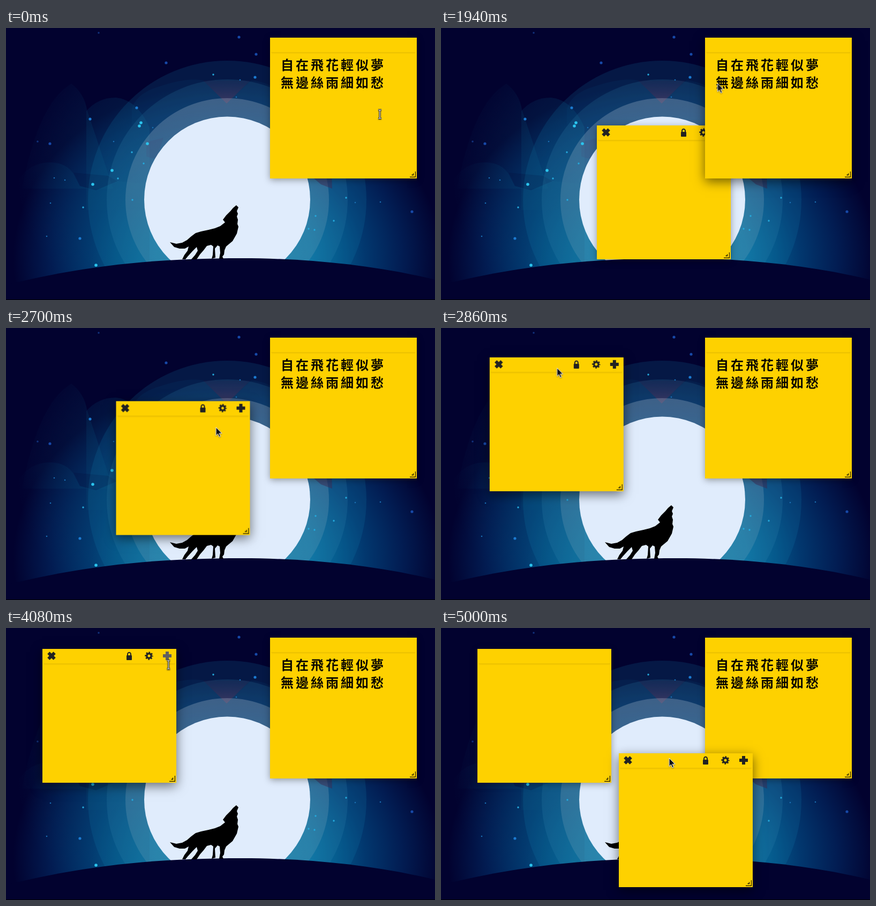
Recreate the animation shown at these times as an HTML page. Size 801 by 508 pixels, loop 5.76 s.

```html
<!DOCTYPE html>
<html lang="zh-Hant">
<head>
<meta charset="utf-8">
<title>Sticky notes</title>
<style>
html, body { margin: 0; width: 100%; height: 100%; overflow: hidden; background: #02022f; }
#stage { position: relative; width: 801px; height: 508px; overflow: hidden; }
#stage > * { position: absolute; left: 0; top: 0; }

.note {
  --near: 0 3px 12px rgba(0, 0, 0, .36);
  --far: 0 6px 20px rgba(0, 0, 0, .55);
  width: 250px; height: 250px;
  background: #fed100;
  box-shadow: var(--near);
}
.bar {
  position: absolute; left: 2px; right: 2px; top: 0; height: 27px;
  border-bottom: 1px solid rgba(110, 80, 0, .12);
  box-shadow: 0 2px 2px -1px rgba(110, 80, 0, .14);
}
.icons { position: absolute; inset: 0; visibility: hidden; color: #222; }
.icons svg { position: absolute; top: 4px; width: 18px; height: 18px; }
.close { left: 8px; }
.lock { right: 79px; }
.gear { right: 42px; }
.plus { right: 8px; }
.grip { position: absolute; right: 2px; bottom: 2px; width: 13px; height: 13px; }
.text {
  position: absolute; left: 20px; top: 33px; white-space: pre;
  font: 700 24px/33px "Noto Sans CJK TC", "Noto Sans CJK", serif;
  letter-spacing: 4px; color: #0a0800;
}

/* loop length 5760 ms */
.note, .icons, .plus { animation: 5760ms step-end infinite; }
#n1 { left: 493px; top: 18px; width: 274px; height: 263px; z-index: 2; animation-name: state1; }
#n2 { animation-name: state2, move2; animation-timing-function: step-end, linear; }
#n3 { animation-name: state3, move3; animation-timing-function: step-end, linear; }
#n1 .icons { animation-name: icons1; }
#n2 .icons { animation-name: icons2; }
#n3 .icons { animation-name: icons3; }
#n1 .plus { animation-name: hover1; }
#n2 .plus { animation-name: hover2; }

@keyframes state1 {
  0%, 38.89% { box-shadow: var(--near); }
  24.31% { box-shadow: var(--far); }
}
@keyframes state2 {
  0% { visibility: hidden; z-index: 1; box-shadow: var(--near); }
  28.82% { visibility: visible; z-index: 1; box-shadow: var(--near); }
  38.89% { visibility: visible; z-index: 3; box-shadow: var(--far); }
  79.86%, 100% { visibility: visible; z-index: 3; box-shadow: var(--near); }
}
@keyframes state3 {
  0% { visibility: hidden; z-index: 1; box-shadow: var(--near); }
  72.92% { visibility: visible; z-index: 1; box-shadow: var(--near); }
  79.86%, 100% { visibility: visible; z-index: 4; box-shadow: var(--far); }
}
@keyframes move2 {
  0%, 44.79% { transform: translate(291px, 182px); }
  45.83% { transform: translate(260px, 166px); }
  46.88% { transform: translate(206px, 137px); }
  48.61% { transform: translate(130px, 82px); }
  49.65% { transform: translate(91px, 55px); }
  51.04% { transform: translate(74px, 43px); }
  52.78%, 100% { transform: translate(68px, 39px); }
}
@keyframes move3 {
  0%, 79.86% { transform: translate(327px, 182px); }
  81.6% { transform: translate(392px, 122px); }
  82.99% { transform: translate(426px, 90px); }
  84.72% { transform: translate(388px, 158px); }
  86.81%, 100% { transform: translate(332px, 234px); }
}
@keyframes icons1 {
  0%, 32.99% { visibility: hidden; }
  16.5% { visibility: visible; }
}
@keyframes icons2 {
  0%, 73.6% { visibility: hidden; }
  32.99% { visibility: visible; }
}
@keyframes icons3 {
  0% { visibility: hidden; }
  74.65%, 100% { visibility: visible; }
}
@keyframes hover1 {
  0%, 32.99% { color: #222; }
  17.36% { color: #5f5f5f; }
}
@keyframes hover2 {
  0%, 73.6% { color: #222; }
  64% { color: #5f5f5f; }
}

#cursor {
  z-index: 9; width: 1px; height: 1px; overflow: visible;
  filter: drop-shadow(0 1px 1px rgba(0, 0, 0, .4));
  animation: cursor 5760ms linear infinite;
}
#arrow { animation: arrow 5760ms step-end infinite; }
#beam { animation: beam 5760ms step-end infinite; }
@keyframes arrow {
  0%, 70% { visibility: hidden; }
  17.36%, 72.2% { visibility: visible; }
}
@keyframes beam {
  0%, 70% { visibility: visible; }
  17.36%, 72.2% { visibility: hidden; }
}
@keyframes cursor {
  0%, 4.86% { transform: translate(698px, 161px); animation-timing-function: ease-in-out; }
  13.89%, 15.3% { transform: translate(731px, 64px); }
  19.1%, 28.82% { transform: translate(753px, 34px); }
  30.56% { transform: translate(690px, 48px); }
  33.68% { transform: translate(517px, 103px); }
  36.81%, 45.83% { transform: translate(405px, 190px); }
  46.88% { transform: translate(393px, 186px); }
  48.61% { transform: translate(270px, 108px); }
  49.65% { transform: translate(217px, 75px); }
  51.04% { transform: translate(192px, 53px); }
  52.78%, 56.25% { transform: translate(182px, 45px); animation-timing-function: ease-in-out; }
  65.28%, 67.01% { transform: translate(301px, 52px); }
  70.83% { transform: translate(303px, 68px); }
  73.26% { transform: translate(345px, 122px); }
  76.04%, 79.86% { transform: translate(421px, 191px); }
  81.77% { transform: translate(486px, 131px); }
  83.16% { transform: translate(520px, 99px); }
  84.9% { transform: translate(482px, 167px); }
  86.81%, 100% { transform: translate(426px, 243px); }
}
</style>
</head>
<body>
<div id="stage">
  <svg width="801" height="508" viewBox="0 0 801 508">
    <defs>
      <radialGradient id="glow" gradientUnits="userSpaceOnUse" cx="413" cy="430" r="400" gradientTransform="translate(0 77.4) scale(1 .82)">
        <stop offset="0" stop-color="#0a8db5"/>
        <stop offset=".4" stop-color="#056c9c"/>
        <stop offset=".64" stop-color="#02386f"/>
        <stop offset=".82" stop-color="#021c52"/>
        <stop offset="1" stop-color="#02022f"/>
      </radialGradient>
      <radialGradient id="cloud" gradientUnits="userSpaceOnUse" cx="290" cy="270" r="270">
        <stop offset="0" stop-color="#06507f" stop-opacity=".45"/>
        <stop offset=".6" stop-color="#06446f" stop-opacity=".24"/>
        <stop offset="1" stop-color="#06406c" stop-opacity="0"/>
      </radialGradient>
      <linearGradient id="halo" x2="0" y2="1">
        <stop offset="0" stop-color="#a9b8cc" stop-opacity=".31"/>
        <stop offset=".7" stop-color="#8fb0c0" stop-opacity=".2"/>
      </linearGradient>
      <linearGradient id="dusk" x2="0" y2="1">
        <stop offset="0" stop-color="#351f4c" stop-opacity=".15"/>
        <stop offset="1" stop-color="#53365c" stop-opacity=".65"/>
      </linearGradient>
      <symbol id="cross" viewBox="-9 -9 18 18">
        <path d="M-8-3h5v-5h6v5h5v6h-5v5h-6v-5h-5z" fill="currentColor"/>
      </symbol>
      <symbol id="padlock" viewBox="-9 -9 18 18">
        <path d="M-3 0v-3a3 3.3 0 0 1 6 0v3" fill="none" stroke="currentColor" stroke-width="2"/>
        <rect x="-5" y="-1" width="10" height="9" rx="1" fill="currentColor"/>
      </symbol>
      <symbol id="cog" viewBox="-9 -9 18 18">
        <circle r="4.2" fill="none" stroke="currentColor" stroke-width="3.4"/>
        <circle r="6.5" fill="none" stroke="currentColor" stroke-width="2.4" stroke-dasharray="2.7 2.405" stroke-dashoffset="1.35"/>
      </symbol>
      <symbol id="corner" viewBox="0 0 13 13">
        <path d="M2 12.5h10.5V2M5.500 8.500h3v-3" fill="none" stroke="#181400" stroke-width="1.300"/>
      </symbol>
    </defs>
    <rect width="801" height="508" fill="#02022f"/>
    <rect width="801" height="508" fill="url(#glow)"/>
    <g fill="url(#cloud)">
      <path d="M30 300Q60 140 122 104Q146 122 151 152L200 300Z"/>
      <path d="M150 155Q172 130 205 130Q245 134 268 186V340H150Z"/>
      <path d="M22 470V285Q45 250 85 251Q112 252 126 272L138 295L168 303L208 286L268 292V470Z"/>
    </g>
    <path d="M126 270L138 295L168 303L208 286L190 276Z" fill="#041340" opacity=".3"/>
    <g id="rings">
      <circle cx="413" cy="321" r="260" fill="#1482b4" opacity=".17"/>
      <circle cx="413" cy="321" r="225" fill="#3488b0" opacity=".2"/>
      <path d="M235 150Q245 120 290 108Q340 92 368 98L412 141L458 98Q485 100 500 112V180H235Z" fill="#0b4674" opacity=".16"/>
      <path d="M368 98H456L412 141Z" fill="url(#dusk)"/>
      <circle cx="413" cy="321" r="190" fill="url(#halo)"/>
      <path d="M262 213L294 205L280 245L262 240Z" fill="#4a416b" opacity=".15"/>
      <path d="M562 270H608L609 300L588 292Z" fill="#3c2b55" opacity=".5"/>
    </g>
    <g id="stars"></g>
    <circle cx="413" cy="320.500" r="155" fill="#e0ecfc"/>
    <path d="M0 480C160 440 300 430 440 430C560 430 690 443 801 470V508H0Z" fill="#02022f"/>
    <path d="M430 331L434 335L431 342L433 347L431 352L433 358L432 366L434 371L431 384L423 398L411 408L408 415L407 423L404 427L406 431H398L400 420L399 408L395 406L390 412L391 429L384 431L386 424L387 408L383 405L375 407L369 415L362 423L356 432H346L353 424L358 416L356 409L348 417L339 427L335 432H329L333 424L339 416L341 408L334 412L324 412L314 409L306 400L318 403L329 401L338 396L346 389L354 383L364 380L378 377L390 374L400 370L409 363L405 358L411 350L419 342L424 336Z"/>
    <path d="M0 507H801V508H0Z"/>
  </svg>

  <div class="note" id="n1"><div class="text">自在飛花輕似夢
無邊絲雨細如愁</div></div>
  <div class="note" id="n2"></div>
  <div class="note" id="n3"></div>

  <svg id="cursor">
    <path id="arrow" d="M0 0V15.500L3.500 12.200L6 18L8.600 16.900L6.100 11.200H11Z" fill="#111" stroke="#fff"/>
    <g id="beam" fill="none">
      <path d="M-3-8H-1L0-7L1-8H3M0-7V7M-3 8H-1L0 7L1 8H3" stroke="#111" stroke-width="3"/>
      <path d="M-3-8H-1L0-7L1-8H3M0-7V7M-3 8H-1L0 7L1 8H3" stroke="#fff" stroke-width="1.200"/>
    </g>
  </svg>
</div>
<script>
const icon = (cls, id, turn = '') =>
  `<svg class="${cls}" viewBox="0 0 18 18"><use href="#${id}" width="18" height="18" ${turn}/></svg>`;

const grip = '<svg class="grip" viewBox="0 0 13 13"><use href="#corner" width="13" height="13"/></svg>';

const chrome = `<div class="bar"></div><div class="icons">${
  icon('close', 'cross', 'transform="rotate(45 9 9)"')}${
  icon('lock', 'padlock')}${icon('gear', 'cog')}${icon('plus', 'cross')
}</div>${grip}`;

for (const note of document.querySelectorAll('.note')) note.insertAdjacentHTML('beforeend', chrome);

// x,y pairs grouped by tint and radius
const stars = [
  ['#1749a8', 2.6, '299,65 435,17 467,49 82,216 758,343'],
  ['#1c7ad0', 2.6, '244,149 157,170 465,92 138,393'],
  ['#2bc4ee', 2.8, '249,183 252,177 264,216 198,266 162,292 168,443'],
  ['#25a9dc', 1.7, '209,281 257,253 235,232 144,335 236,321 387,87 578,351 612,360 635,317 565,375 576,377'],
  ['#1a70b4', 1.3, '274,186 201,212 90,280 110,284 83,327 76,389 430,129 652,326 699,325 437,97'],
  ['#12327c', 1.8, '59,212 173,9']
];
document.getElementById('stars').innerHTML = stars.map(([fill, r, spots]) =>
  spots.split(' ').map(p => {
    const [x, y] = p.split(',');
    return `<circle cx="${x}" cy="${y}" r="${r}" fill="${fill}"/>`;
  }).join('')).join('');
</script>
</body>
</html>
```
